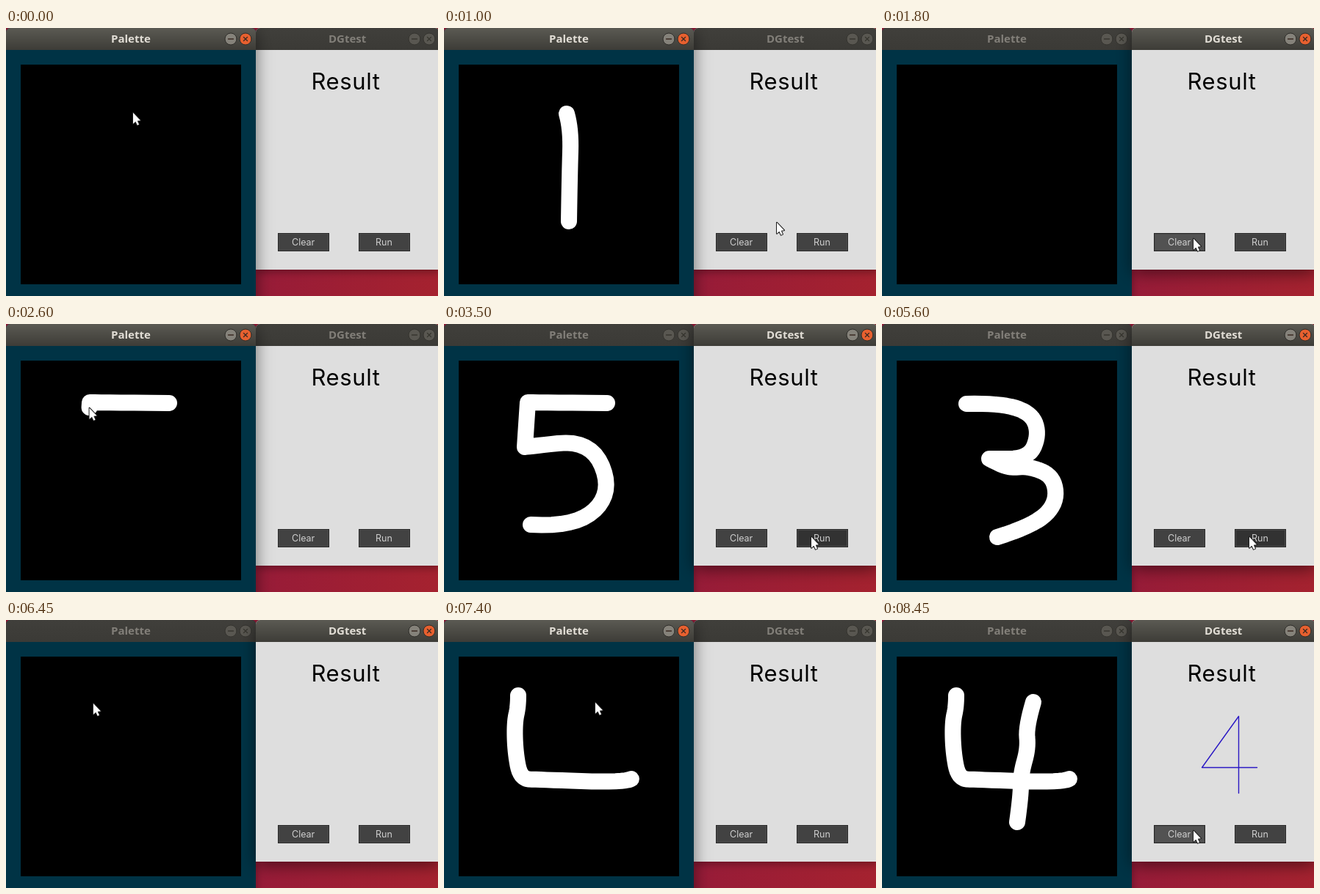
Animation, 588 px wide and 366 px high, one loop 8500 ms. Source, as an HTML page with a canvas:

```html
<!DOCTYPE html>
<html lang="en">
<head>
<meta charset="utf-8">
<title>Digit palette</title>
<style>
  html, body { margin: 0; width: 588px; height: 366px; overflow: hidden; background: #951c31; }
  canvas { display: block; }
</style>
</head>
<body>
<canvas id="stage" width="588" height="366"></canvas>
<script>
const ctx = document.getElementById('stage').getContext('2d');
const LOOP = 8500, STEP = 50;
const PEN = 22, SPEED = 0.5, GAP = 330;   // px, px per ms, ms between strokes
const HOLD = 100, CLEAR_DELAY = 450;
const START = [173, 115], RUN = [500, 290], CLEAR = [424, 287];

// Each round: draw a digit, press Run, press Clear. A repeated point makes a sharp corner.
const rounds = [
  { digit: 1, draw: 150, run: 1250, rest: [453, 265], strokes: [
    [[167, 117], [173, 138], [171, 200], [170, 264]]] },
  { digit: 5, draw: 2370, run: 3450, strokes: [
    [[222, 108], [114, 107], [114, 107], [110, 168], [110, 168], [200, 158], [230, 230], [180, 278], [118, 274]]] },
  { digit: 3, draw: 4500, run: 5550, strokes: [
    [[115, 109], [160, 108], [203, 121], [214, 150], [200, 184], [146, 184], [146, 184],
      [172, 197], [200, 194], [234, 208], [238, 246], [205, 276], [157, 291]]] },
  { digit: 4, draw: 6600, run: 8100, strokes: [
    [[101, 103], [101, 118], [96, 140], [97, 180], [104, 217], [128, 218], [246, 222], [255, 217]],
    [[206, 112], [196, 146], [199, 175], [189, 210], [189, 240], [184, 276]]] }
];

const clamp = v => Math.max(0, Math.min(1, v));
const ease = v => v * v * (3 - 2 * v);
const last = list => list[list.length - 1];
const mix = (a, b, k) => [a[0] + (b[0] - a[0]) * k, a[1] + (b[1] - a[1]) * k];
const dist = (a, b) => Math.hypot(b[0] - a[0], b[1] - a[1]);
const length = path => path.slice(1).reduce((sum, p, i) => sum + dist(path[i], p), 0);

// Quadratic spline through the midpoints of the control points.
function smooth(pts) {
  const out = [pts[0]];
  for (let i = 1; i < pts.length - 1; i++) {
    const a = last(out), c = pts[i];
    const b = i === pts.length - 2 ? pts[i + 1] : mix(c, pts[i + 1], 0.5);
    for (let k = 0.125; k <= 1; k += 0.125) out.push(mix(mix(a, c, k), mix(c, b, k), k));
  }
  return out;
}

function partial(path, k) {
  let left = k * length(path);
  const out = [path[0]];
  for (let i = 1; i < path.length && left > 0; i++) {
    const d = dist(path[i - 1], path[i]);
    out.push(mix(path[i - 1], path[i], Math.min(1, left / (d || 1))));
    left -= d;
  }
  return out;
}

function plan() {
  const legs = [];
  let pos = START;
  const add = (path, from, to, until = 0) => {
    legs.push({ path, from, to, until });
    pos = last(path);
  };
  const go = (point, from, to) => add([pos, point], from, to);
  for (const { draw, run, rest, strokes } of rounds) {
    let t = draw;
    go(strokes[0][0], Math.max(0, t - 450), t - 100);
    strokes.forEach((pts, i) => {
      if (i) {
        go(pts[0], t, t + GAP / 2);
        t += GAP;
      }
      const path = smooth(pts), end = t + length(path) / SPEED;
      add(path, t, end, run + CLEAR_DELAY + HOLD);
      t = end;
    });
    if (rest) go(rest, run - 450, run - 300);
    go(RUN, Math.max(t, run - 250), run - 50);
    go(CLEAR, run + 150, run + 300);
  }
  return legs;
}
const legs = plan();
const progress = (leg, t) => clamp((t - leg.from) / (leg.to - leg.from));

function pointerAt(t) {
  const leg = last(legs.filter(l => l.from <= t));
  const k = progress(leg, t);
  return last(partial(leg.path, leg.until ? k : ease(k)));
}

function stateAt(t) {
  const within = (from, span) => t >= from && t < from + span;
  const held = rounds.find(r => within(r.run, HOLD)) ? 'Run'
    : rounds.find(r => within(r.run + CLEAR_DELAY, HOLD)) ? 'Clear' : '';
  const shown = rounds.find(r => within(r.run + HOLD, CLEAR_DELAY));
  return {
    held,
    digit: shown && shown.digit,
    pointer: pointerAt(t),
    paletteOn: t < rounds[0].run || rounds.some(r => t >= r.draw && t < r.run)
  };
}

// Single-stroke digits on a 21 unit grid.
const bowl = (from, to) => Array.from({ length: 13 }, (_, i) => {
  const a = (from + (to - from) * i / 12) * Math.PI / 180;
  return [10.5 + 6.5 * Math.cos(a), 2.5 + 6.5 * Math.sin(a)];
});
const digits = {
  1: [[6, -8], [11, -12], [11, 9]],
  3: [[5, -12], [16, -12], [10, -4], ...bowl(-90, 160)],
  4: [[13, 9], [13, -12], [3, 2], [18, 2]],
  5: [[15, -12], [5, -12], [4, -3], ...bowl(-130, 160)]
};

function line(path, color, width) {
  ctx.beginPath();
  path.forEach(([x, y]) => ctx.lineTo(x, y));
  if (path.length === 1) ctx.lineTo(path[0][0] + 0.01, path[0][1]);
  ctx.strokeStyle = color;
  ctx.lineWidth = width;
  ctx.lineCap = ctx.lineJoin = 'round';
  ctx.stroke();
}

function rect(x, y, w, h, color) {
  ctx.fillStyle = color;
  ctx.fillRect(x, y, w, h);
}

function text(str, x, y, font, color, spacing = 0) {
  ctx.font = font;
  ctx.letterSpacing = spacing + 'px';
  ctx.fillStyle = color;
  ctx.fillText(str, x, y);
}

function gradient(x, y, from, to) {
  const g = ctx.createLinearGradient(x, 0, x ? 588 : 0, y);
  g.addColorStop(0, from);
  g.addColorStop(1, to);
  return g;
}

function titleButton(x, on, close) {
  ctx.beginPath();
  ctx.arc(x, 15, 8, 0, 7);
  ctx.fillStyle = !on ? '#595751' : close ? '#e7602f' : '#85827a';
  ctx.fill();
  ctx.strokeStyle = on ? '#2f2e2a' : '#35342f';
  ctx.lineWidth = 1;
  ctx.stroke();
  const ink = on ? '#3a2a22' : '#37362f';
  if (close) {
    line([[x - 2.5, 12.5], [x + 2.5, 17.5]], ink, 1.3);
    line([[x + 2.5, 12.5], [x - 2.5, 17.5]], ink, 1.3);
  } else {
    line([[x - 3.5, 15], [x + 3.5, 15]], ink, 1.3);
  }
}

function frame(x, w, h, body, title, titleX, on) {
  ctx.save();
  ctx.shadowColor = on ? 'rgba(0,0,0,0.5)' : 'rgba(0,0,0,0.35)';
  ctx.shadowBlur = on ? 22 : 12;
  ctx.shadowOffsetY = on ? 5 : 3;
  ctx.beginPath();
  ctx.roundRect(x, 0, w, h, [6, 6, 0, 0]);
  ctx.fillStyle = body;
  ctx.fill();
  ctx.restore();

  ctx.beginPath();
  ctx.roundRect(x, 0, w, 30, [6, 6, 0, 0]);
  ctx.fillStyle = on ? gradient(0, 30, '#5b5a53', '#3d3c37') : gradient(0, 30, '#403f3b', '#3b3a36');
  ctx.fill();
  text(title, titleX, 20, 'bold 15px "Noto Sans", "Open Sans", sans-serif', on ? '#e2ded6' : '#827f79');
  titleButton(x + w - 34, on, false);
  titleButton(x + w - 14, on, true);
}

function palette(t, s) {
  frame(0, 340, 400, '#003345', 'Palette', 143, s.paletteOn);
  rect(20, 50, 300, 300, '#000');
  for (const leg of legs) {
    if (t >= leg.from && t < leg.until) line(partial(leg.path, progress(leg, t)), '#fff', PEN);
  }
}

function button(name, x, textX, s) {
  const y = 280, [px, py] = s.pointer;
  const over = px >= x && px < x + 70 && py >= y && py < y + 25;
  rect(x, y, 70, 25, '#292929');
  rect(x + 1, y + 1, 68, 23, '#4a4a4a');
  rect(x + 2, y + 2, 66, 21, s.held === name ? '#323232' : over ? '#525252' : '#424242');
  text(name, textX, 297, '12.5px Inter, sans-serif', '#cecece');
}

function results(s) {
  frame(340, 250, 330, '#dedede', 'DGtest', 439, !s.paletteOn);
  text('Result', 415.5, 83.5, '31px Inter, sans-serif', '#000', 0.6);
  if (s.digit) line(digits[s.digit].map(([x, y]) => [420.5 + x * 5, 191.5 + y * 5]), '#2a18c4', 1.4);
  button('Clear', 370, 389, s);
  button('Run', 480, 503, s);
}

function arrow([x, y]) {
  ctx.beginPath();
  [[0, 0], [0, 15], [3.4, 12], [5.8, 17], [8, 16], [5.8, 11], [10, 10.6]]
    .forEach(([dx, dy]) => ctx.lineTo(x + dx, y + dy + 0.7));
  ctx.closePath();
  ctx.lineJoin = 'round';
  ctx.lineWidth = 2;
  ctx.strokeStyle = '#1c1c1c';
  ctx.stroke();
  ctx.fillStyle = '#fff';
  ctx.fill();
}

function draw(t) {
  const s = stateAt(t);
  rect(0, 0, 588, 366, gradient(340, 0, '#971b38', '#a5222f'));
  if (s.paletteOn) {
    results(s);
    palette(t, s);
  } else {
    palette(t, s);
    results(s);
  }
  arrow(s.pointer);
}

const begin = performance.now();
function tick(now) {
  const t = Math.max(0, now - begin) % LOOP;
  draw(Math.floor(t / STEP) * STEP);
  requestAnimationFrame(tick);
}
draw(0);
requestAnimationFrame(tick);
</script>
</body>
</html>
```
